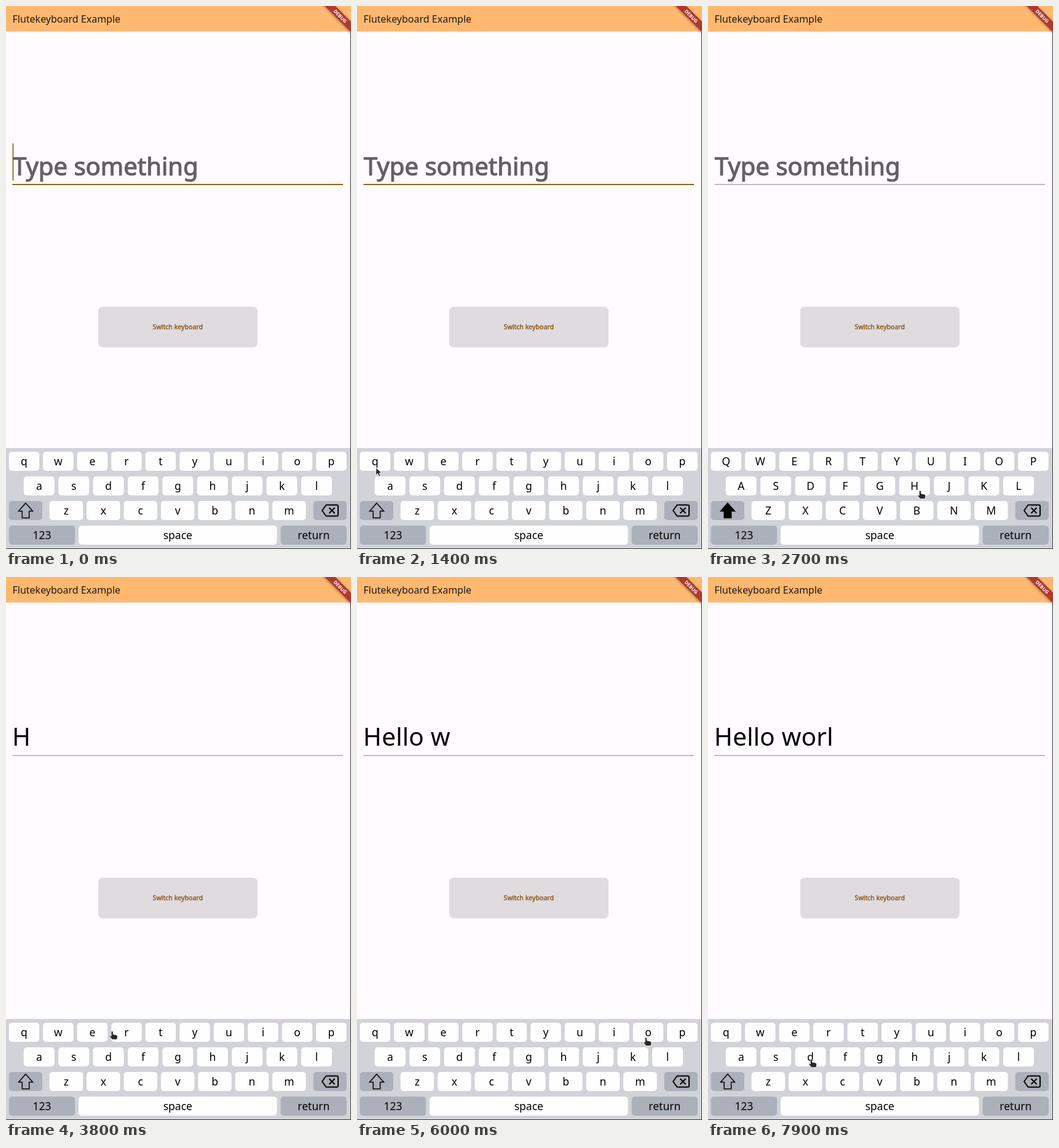
Write an HTML page that moves like this. It is 561x882 px and loops after 8000 ms.

```html
<!DOCTYPE html>
<html lang="en">
<head>
<meta charset="utf-8">
<title>Keyboard demo</title>
<style>
  html, body { margin: 0; width: 100%; height: 100%; overflow: hidden; background: #fffbff; }
  svg { display: block; width: 100%; height: 100%; }
  text { font-family: "Noto Sans", "Open Sans", sans-serif; white-space: pre; }
  .key { font-size: 17.5px; text-anchor: middle; }
</style>
</head>
<body>
<svg id="stage" viewBox="0 0 561 882">
  <defs>
    <filter id="shade" x="-20%" y="-50%" width="140%" height="200%">
      <feGaussianBlur stdDeviation="2"/>
    </filter>
  </defs>
  <rect width="561" height="882" fill="#fffbff"/>
  <rect width="561" height="41.5" fill="#ffb870"/>
  <text x="10.5" y="26.5" font-size="16" fill="#201a17">Flutekeyboard Example</text>
  <g transform="translate(543.5 16.5) rotate(45)">
    <rect x="-40" y="-5" width="80" height="12" fill="#000" opacity=".4" filter="url(#shade)"/>
    <rect x="-40" y="-6" width="80" height="12" fill="#b0392f"/>
    <text y="2.9" font-size="7.8" font-weight="900" text-anchor="middle" fill="#fff">DEBUG</text>
  </g>

  <text id="hint" x="11" y="274.5" font-size="40" fill="#655f64" stroke="#655f64" stroke-width="1.2">Type something</text>
  <text id="typed" x="10" y="274" font-size="40.5" letter-spacing=".15"></text>
  <rect id="line" x="10.5" width="537.5"/>
  <rect id="caret" x="10.7" y="223" width="1.5" height="60.5" fill="#875200"/>

  <rect x="150" y="488.5" width="259" height="66" rx="7" fill="#e0dbdf"/>
  <text x="279.3" y="525" font-size="10.6" text-anchor="middle" fill="#875210" stroke="#875210" stroke-width=".35">Switch keyboard</text>

  <rect y="718" width="561" height="164" fill="#d1d3d9"/>
  <g id="keys"></g>
  <path id="shift" d="M32 807.5 L43.5 820.5 H37.7 V831.5 H26.3 V820.5 H20.5 Z" stroke="#000" stroke-width="1.5"/>
  <g fill="none" stroke="#000" stroke-width="2">
    <path d="M514 819.5 L520.5 810.5 H538 Q540 810.5 540 812.5 V826.5 Q540 828.5 538 828.5 H520.5 Z" stroke-linejoin="round"/>
    <path d="M525.5 815 L534.5 824 M534.5 815 L525.5 824"/>
  </g>
  <path d="M560.5 42 V882 M0 881.5 H561" stroke="#34343a"/>

  <path id="arrow" d="M0 0 V12 L2.8 9.4 L4.9 14 L7 13 L5 8.6 H8.8 Z" fill="#222" stroke="#fff" stroke-width=".7"/>
  <path id="hand" d="M-1.5 .8 Q0 -1 1.5 .8 V5 L7 6.2 Q8.6 6.6 8.6 8.2 V11 L7.5 13.5 H.2 L-4 8.6 Q-4 6.6 -1.5 8 Z" fill="#262629" stroke="#fff" stroke-width=".7"/>
</svg>
<script>
const LOOP = 8000;
const NS = "http://www.w3.org/2000/svg";
const $ = id => document.getElementById(id);
const [hint, typed, line, caret, keys, shift, arrow, hand] =
  ["hint", "typed", "line", "caret", "keys", "shift", "arrow", "hand"].map($);

function add(tag, attrs) {
  const el = document.createElementNS(NS, tag);
  for (const name in attrs) el.setAttribute(name, attrs[name]);
  keys.append(el);
  return el;
}

function addKey(x, y, w, label, fill = "#fffeff") {
  add("rect", { x, y, width: w, height: 31, rx: 5, fill });
  const el = add("text", { x: x + w / 2, y: y + 22, class: "key" });
  el.textContent = label;
  return el;
}

const GREY = "#abb0ba";
const letters = [];
function addRow(chars, x, y, w, step) {
  [...chars].forEach((c, i) => letters.push({ c, el: addKey(x + i * step, y, w, c) }));
}
addRow("qwertyuiop", 4.7, 724, 49.5, 55.5);
addRow("asdfghjkl", 28.8, 764, 50, 56.4);
addRow("zxcvbnm", 70.7, 804, 54.5, 60.4);
addKey(4.7, 804, 54.3, "", GREY);
addKey(499.7, 804, 54.3, "", GREY);
addKey(4.7, 844, 107.5, "123", GREY);
addKey(118, 844, 322.6, "space");
addKey(446.6, 844, 107.4, "return", GREY);

// Pointer stops: arrival time, departure time, x, y
const stops = [
  [700, 700, 561, 300], [1300, 1450, 31, 750], [1800, 2050, 33, 815],
  [2650, 3250, 345, 787], [3980, 4380, 142, 729], [4600, 4740, 505, 781],
  [4830, 4870, 474, 748], [5000, 5250, 320, 847], [5550, 5680, 88, 745],
  [5950, 6200, 470, 748], [6600, 6980, 196, 745], [7200, 7400, 505, 780],
  [7830, 8000, 168, 783]
];

const TEXT = "Hello worl";
const presses = [2800, 4000, 4620, 4730, 4860, 5150, 5620, 6200, 7000, 7400];
const SHIFT_ON = 2000, SHIFT_OFF = 3300, HAND_FROM = 1600;

const ease = u => u * u * (3 - 2 * u);
const show = (el, on) => el.setAttribute("visibility", on ? "visible" : "hidden");

function pointerAt(t) {
  const i = stops.findLastIndex(s => s[0] <= t);
  if (i < 0) return null;
  const [, leave, x, y] = stops[i];
  const next = stops[i + 1];
  if (t <= leave || !next) return [x, y];
  const k = ease((t - leave) / (next[0] - leave));
  return [x + (next[2] - x) * k, y + (next[3] - y) * k];
}

function draw(t) {
  const count = presses.filter(p => p <= t).length;
  typed.textContent = TEXT.slice(0, count);
  show(hint, count === 0);

  const focused = t < SHIFT_ON;
  line.setAttribute("y", focused ? 289 : 289.2);
  line.setAttribute("height", focused ? 1.8 : 1.4);
  line.setAttribute("fill", focused ? "#875200" : "#aaa3a8");
  show(caret, focused && (t + 200) % 1000 < 500);

  const upper = t >= SHIFT_ON && t < SHIFT_OFF;
  for (const { c, el } of letters) el.textContent = upper ? c.toUpperCase() : c;
  shift.setAttribute("fill", upper ? "#000" : "none");

  const pos = pointerAt(t);
  const isHand = t >= HAND_FROM;
  show(arrow, pos && !isHand);
  show(hand, pos && isHand);
  if (pos) (isHand ? hand : arrow).setAttribute("transform", `translate(${pos})`);
}

const start = performance.now();
function frame() {
  draw((performance.now() - start) % LOOP);
  requestAnimationFrame(frame);
}
frame();
</script>
</body>
</html>
```
